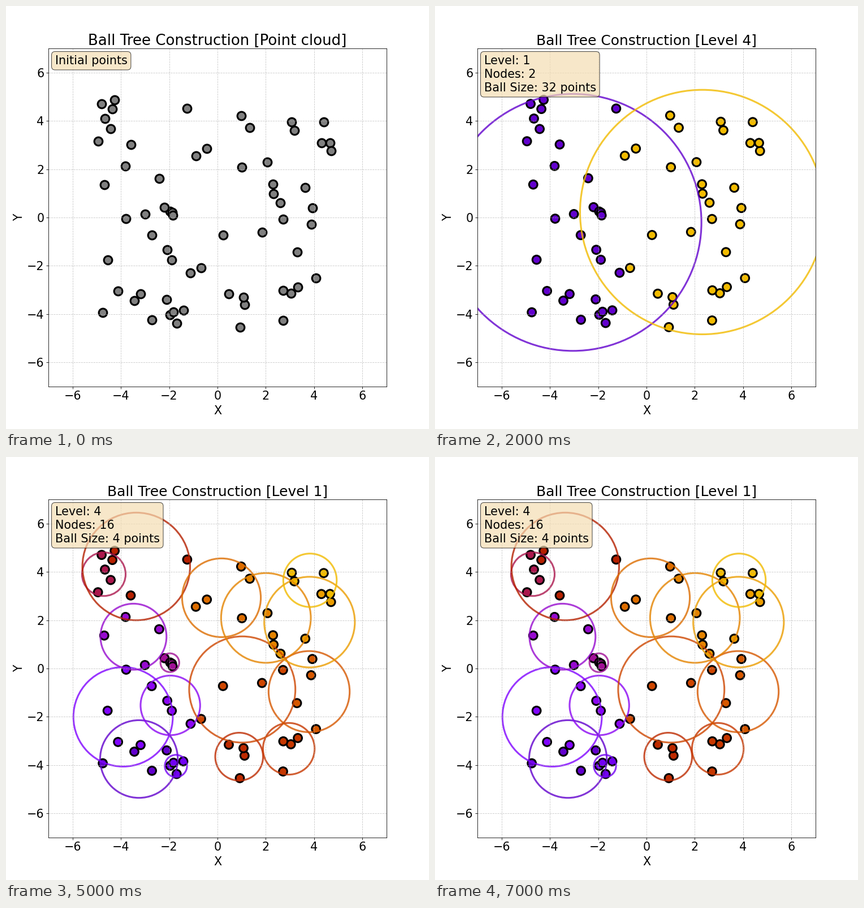
These frames come from a looping animation (748 by 748 pixels, 8000 ms). A matplotlib script:

```python
import numpy as np
import matplotlib.pyplot as plt
from matplotlib.animation import FuncAnimation
from matplotlib.patches import Circle

LEVELS = [None, 0, 1, 2, 3, 4, 5, 4]
DEEPEST = 5
MARKER = dict(s=200, edgecolors="black", linewidths=3)


def tree_order(points):
    """Sort points so that every ball of the tree is a contiguous slice."""
    if len(points) <= 2:
        return points
    axis = points.var(axis=0).argmax()
    points = points[points[:, axis].argsort()]
    half = len(points) // 2
    return np.vstack([tree_order(points[:half]), tree_order(points[half:])])


np.random.seed(42)
cloud = np.random.uniform(-5, 5, (64, 2))
tree = tree_order(cloud)

fig, ax = plt.subplots(figsize=(10, 10), dpi=74.8)
fig.subplots_adjust(left=0.1, right=0.9, bottom=0.1, top=0.9)


def ball_colors(level):
    shades = np.linspace(0.15, 0.9, 2 ** level)
    if level == 0:
        shades = np.array([0.7])
    elif level == DEEPEST:
        shades = shades[::-1]
    return plt.get_cmap("gnuplot")(shades)


def setup_axes():
    ax.clear()
    ax.set(xlim=(-7, 7), ylim=(-7, 7))
    ax.set_aspect("equal")
    ax.set_xticks(range(-6, 7, 2))
    ax.set_yticks(range(-6, 7, 2))
    ax.tick_params(labelsize=20)
    ax.set_xlabel("X", fontsize=20, labelpad=5)
    ax.set_ylabel("Y", fontsize=20)
    ax.grid(True, linestyle="--", alpha=0.7)


def annotate(stage, info, title_size):
    ax.set_title(f"Ball Tree Construction [{stage}]", fontsize=title_size)
    ax.text(0.02, 0.98, info, transform=ax.transAxes, fontsize=20, va="top",
            linespacing=1.25,
            bbox=dict(boxstyle="round", facecolor="wheat", alpha=0.7))


def draw_balls(level):
    count = 2 ** level
    size = len(tree) // count
    colors = ball_colors(level)
    ax.scatter(*tree.T, c=np.repeat(colors, size, axis=0), **MARKER)
    for ball, color in zip(tree.reshape(count, size, 2), colors):
        center = ball.mean(axis=0)
        radius = np.linalg.norm(ball - center, axis=1).max() + 0.1
        ax.add_patch(Circle(center, radius, fill=False, edgecolor=color,
                            linewidth=3, alpha=0.8))
    annotate(f"Level {DEEPEST - level}",
             f"Level: {level}\nNodes: {count}\nBall Size: {size} points", 24)


def update(frame):
    setup_axes()
    level = LEVELS[frame]
    if level is None:
        ax.scatter(*cloud.T, color="gray", **MARKER)
        annotate("Point cloud", "Initial points", 25)
    else:
        draw_balls(level)
    return []


anim = FuncAnimation(fig, update, frames=len(LEVELS), interval=1000,
                     init_func=lambda: [], repeat=True, repeat_delay=0)
plt.show()
```
